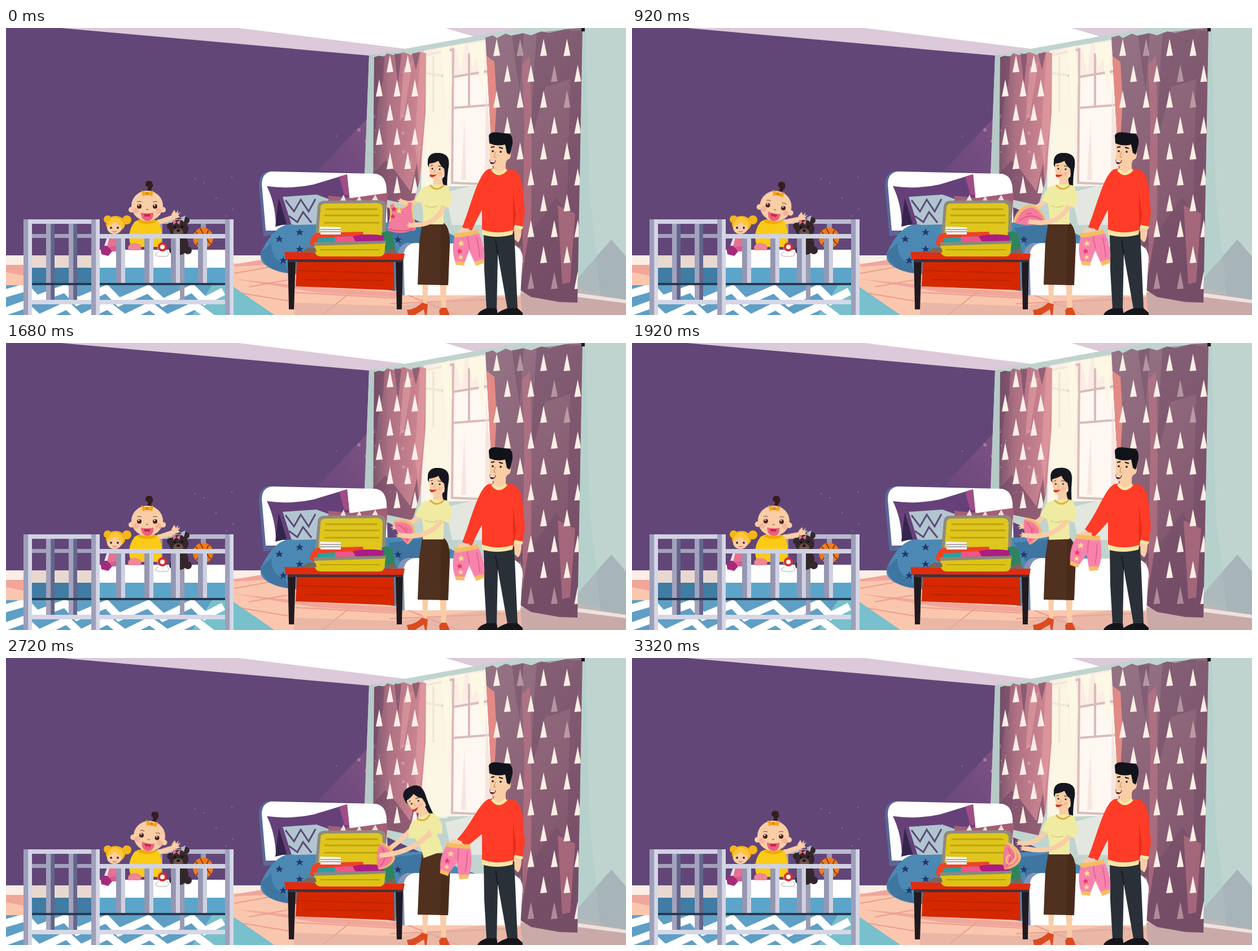
An HTML page for the animation above (3360 ms loop, 1098x510 px).

```html
<!DOCTYPE html>
<html lang="en">
<head>
<meta charset="utf-8">
<title>Packing for the baby</title>
<style>
html, body { margin: 0; width: 100%; height: 100%; overflow: hidden; background: #624678; }
svg { display: block; width: 100vw; height: 100vh; }
.skin { fill: #f9cda6; }
.limb { fill: none; stroke: #f9cda6; stroke-width: 8.5; stroke-linecap: round; stroke-linejoin: round; }
.move { animation: 3.36s linear infinite; }

.nod { transform-origin: 250px 340px; animation: nod .84s cubic-bezier(.37,0,.63,1) infinite alternate; }
@keyframes nod { to { transform: rotate(11deg); } }
.wave { transform-origin: 272px 345px; animation: wave .28s cubic-bezier(.37,0,.63,1) infinite alternate; }
@keyframes wave { to { transform: rotate(9deg); } }

.torso { transform-origin: 757px 348px; animation-name: torso; }
@keyframes torso {
  0%, 51% { transform: none; }
  57.1% { transform: rotate(-2deg); }
  69% { transform: rotate(-10deg); }
  81% { transform: rotate(-20deg); animation-timing-function: ease-in-out; }
  98%, 100% { transform: none; }
}
.head { transform-origin: 762px 282px; animation-name: head; }
@keyframes head {
  0%, 51% { transform: none; }
  57.1% { transform: rotate(-2deg); }
  69% { transform: rotate(-5deg); }
  81% { transform: rotate(-7deg); animation-timing-function: ease-in-out; }
  98%, 100% { transform: none; }
}
.near { animation-name: near; }
@keyframes near {
  0% { d: path("M779 304Q770 350 722 350"); }
  14% { d: path("M779 304Q765 352 712 339"); }
  27.4% { d: path("M779 306Q760 352 712 345"); }
  39.3% { d: path("M779 306Q758 349 708 342"); }
  57.1% { d: path("M776 308Q750 349 699 342"); }
  69% { d: path("M767 306Q735 348 687 346"); }
  81% { d: path("M755 306Q724 344 671 350"); }
  98%, 100% { d: path("M779 308Q758 350 699 339"); }
}
.far { animation-name: far; }
@keyframes far {
  0% { d: path("M738 298Q722 317 705 310"); }
  14% { d: path("M738 300Q718 325 700 321"); }
  27.4% { d: path("M738 300Q716 326 697 322"); }
  39.3% { d: path("M738 302Q718 327 692 328"); }
  57.1% { d: path("M735 302Q713 326 696 326"); }
  69% { d: path("M728 300Q708 325 700 328"); }
  81% { d: path("M720 302Q702 322 682 337"); }
  98%, 100% { d: path("M738 302Q716 332 692 329"); }
}
.shirt { transform-origin: 700px 334px; animation-name: shirt; }
@keyframes shirt {
  0% { transform: none; opacity: 1; }
  20% { transform: translate(4px, -1px) scale(1.06, .62); opacity: 1; }
  20.01%, 100% { transform: translate(4px, -1px) scale(1.06, .62); opacity: 0; }
}
.fold { animation-name: fold; }
@keyframes fold {
  0%, 20% { transform: translate(704px, 333px); opacity: 0; }
  20.01%, 27.4% { transform: translate(704px, 333px); opacity: 1; }
  39.3% { transform: translate(705px, 331px) rotate(32deg) scale(.86, .9); }
  57.1% { transform: translate(709px, 333px) rotate(82deg) scale(.84); }
  69% { transform: translate(688px, 345px) rotate(88deg) scale(.84); }
  81%, 100% { transform: translate(672px, 353px) rotate(98deg) scale(.84, .9); opacity: 1; }
}
.swirl { animation-name: swirl; }
@keyframes swirl { 0%, 81% { opacity: 0; } 88%, 100% { opacity: 1; } }
.pants { animation-name: pants; }
@keyframes pants {
  0%, 51% { transform: translate(815px, 365px) rotate(-10deg); }
  57.1% { transform: translate(808px, 345px) rotate(5deg); }
  69% { transform: translate(799px, 328px) rotate(3deg); }
  81% { transform: translate(801px, 333px) rotate(5deg); animation-timing-function: ease-in-out; }
  98%, 100% { transform: translate(815px, 365px) rotate(-10deg); }
}
.sleeve { animation-name: sleeve; }
@keyframes sleeve {
  0%, 51% { d: path("M854 251C836 258 822 320 808 354L825 360C835 337 845 317 856 304Z"); }
  57.1% { d: path("M854 251C838 258 826 299 802 331L818 345C834 330 846 313 856 304Z"); }
  69% { d: path("M854 251C838 258 824 294 797 317L815 330C834 318 846 308 856 304Z"); }
  81% { d: path("M854 251C838 258 824 296 799 322L816 335C834 321 846 309 856 304Z"); animation-timing-function: ease-in-out; }
  98%, 100% { d: path("M854 251C836 258 822 320 808 354L825 360C835 337 845 317 856 304Z"); }
}
</style>
</head>
<body>
<svg viewBox="0 0 1098 510" preserveAspectRatio="none">
<defs>
  <linearGradient id="drapeL"><stop offset="0" stop-color="#7b566e"/><stop offset=".3" stop-color="#ad7083"/><stop offset="1" stop-color="#d48a93"/></linearGradient>
  <linearGradient id="drapeR" x2=".3" y2="1"><stop offset="0" stop-color="#957486"/><stop offset=".55" stop-color="#8b6176"/><stop offset="1" stop-color="#7d526b"/></linearGradient>
  <linearGradient id="beam" x1="1" y1="0" x2="0" y2="1"><stop offset="0" stop-color="#e590b0" stop-opacity=".45"/><stop offset="1" stop-color="#b05a98" stop-opacity=".12"/></linearGradient>
  <linearGradient id="pane" x2="0" y2="1"><stop offset="0" stop-color="#fbeae4"/><stop offset="1" stop-color="#fdf4ea"/></linearGradient>
  <clipPath id="clipL"><path d="M652 52L675 45L744 44L743 150L733 270L720 315L650 300Z"/></clipPath>
  <clipPath id="clipR"><path d="M849 17L1021 0L1012 488L930 478L905 462L862 250Z"/></clipPath>
  <clipPath id="rug"><path d="M0 457H398L475 510H0Z"/></clipPath>
  <marker id="hand" markerUnits="userSpaceOnUse" markerWidth="18" markerHeight="15" refX="5" refY="10" orient="auto" viewBox="0 0 24 20">
    <path d="M2 5Q9 4 12 5L20 3L16 8L23 9L16 12L19 16L10 15L2 15Z" fill="#f9cda6"/>
  </marker>
  <path id="star" d="M0-7L2-2L7-2L3 1L5 6L0 3L-5 6L-3 1L-7-2L-2-2Z"/>
</defs>

<!-- room -->
<path fill="#624678" d="M0 0H97L643 48L634 260V410H0Z"/>
<path fill="#dcc9d9" d="M97 0H1030V20L850 30L643 49Z"/>
<path fill="#fff" d="M412 0H778L828 15L707 37Z"/>
<path fill="#c0d4cf" d="M643 48L707 37L828 15L915 0H1098V483L1012 470L634 300Z"/>
<path fill="#a6cac5" d="M1022 0H1026L1034 300L1054 475L1012 471Z" opacity=".4"/>
<path fill="#fbeee7" d="M0 404H460V424H0Z"/>
<path fill="#fbc6ae" d="M0 421L470 418L690 390L1098 482V510H0Z"/>
<path fill="#f1a69b" d="M0 421H31V440L0 434ZM404 420L452 412L480 420L404 424ZM404 446L560 462L700 470V479L550 470Z"/>
<g stroke="#e99e8f" stroke-width="2" fill="none"><path d="M404 436L494 420M410 470L500 485M512 470L690 480M430 460L498 448M610 470L560 510M700 470L800 510M680 490L910 480"/></g>
<path fill="#dfaea2" opacity=".6" d="M510 488L690 494L850 475L930 484L910 510H510Z"/>
<path fill="#c9aaa9" d="M910 470L1012 475L1098 486V510H915Z"/>
<path fill="#eee2df" d="M1012 471L1098 483V489L1012 478Z"/>
<path fill="#a8b3ba" opacity=".75" d="M1000 459L1072 376L1098 406V483L1012 471Z"/>
<path fill="#7f8f9b" opacity=".15" d="M1046 405L1072 376L1098 406V483L1053 476Z"/>
<path fill="url(#beam)" d="M744 50L553 253L680 262L742 250Z"/>

<!-- window -->
<path fill="url(#pane)" d="M740 40L852 20L866 280L760 282L735 300Z"/>
<path fill="#fff8f2" d="M795 84H853L860 278L792 275Z"/>
<g fill="none" stroke="#d9bcb9" stroke-width="4"><path d="M744 48L792 38L790 275L856 278M792 87L852 77M792 142L855 137M820 45V140M757 50V150M744 80L792 88"/></g>
<path fill="#fcf8e3" d="M742 46L770 35L773 105L786 215L782 285H742Z" opacity=".72"/>
<path fill="#fcf8e3" d="M770 37L785 31L790 90L782 192ZM793 32L813 28L806 83L800 50ZM818 28L849 24L844 125L834 55L826 70Z"/>
<path fill="#f3ded8" d="M812 160L815 270L806 270ZM850 100L864 278L848 278Z" opacity=".7"/>
<path fill="#f3f0e8" opacity=".7" d="M778 292L835 278L855 350H790Z"/>

<!-- curtains -->
<path fill="#b5cac7" d="M643 49L654 47L650 300L635 260Z"/>
<path fill="url(#drapeL)" d="M652 52L660 49L669 51L675 45L686 48L704 43L718 48L730 42L744 45L743 150L733 270L720 315L650 300Z"/>
<g clip-path="url(#clipL)">
  <path fill="#6f4864" opacity=".6" d="M652 50L670 50L668 90L659 130L650 220ZM688 45L700 47L694 103ZM650 260L672 235L690 255L716 290L728 240L735 320H650ZM719 45L733 43L726 75Z"/>
  <path fill="#e8a4a5" opacity=".5" d="M734 43L744 44L740 170L730 250L724 200ZM704 70L720 60L705 155L697 165Z"/>
</g>
<g id="trisL" fill="#fdeee8" clip-path="url(#clipL)"></g>
<path fill="url(#drapeR)" d="M849 17L862 13L869 18L885 10L896 14L915 9L930 13L948 6L962 9L990 2L1021 0L1012 488L980 487L930 478L905 462L862 250Z"/>
<g clip-path="url(#clipR)">
  <path fill="#e38a85" d="M849 48L865 60L869 130L862 250Z"/>
  <path fill="#6d4863" opacity=".4" d="M896 12L917 10L910 110L904 75ZM940 8L1000 1L1001 90L955 105L930 200L934 90ZM1001 5H1021L1012 488L990 488ZM905 380L940 350L975 300L1012 360V488H905Z"/>
  <path fill="#c17787" opacity=".6" d="M914 65L928 50L931 200L930 340L914 440L918 170ZM977 315L1008 330L999 452L985 455Z"/>
</g>
<g id="trisR" fill="#fdeee4" clip-path="url(#clipR)"></g>
<path fill="#191820" d="M1019 0H1025V6H1019Z"/>
<g id="dust" fill="#e5a8bd"></g>

<!-- bed -->
<path fill="#59689a" d="M448 282Q447 255 468 254L490 255L470 272L474 368L456 370Z"/>
<path fill="#fff" d="M453 278Q453 257 471 255L654 259Q672 261 674 285L676 360L460 360Z"/>
<path fill="#664179" d="M462 281Q505 287 545 278L604 260L608 300L600 350H478Q477 312 462 281Z"/>
<path fill="#a04d86" d="M590 264L604 260L608 298L599 296Z"/>
<path fill="#34254c" d="M477 353L483 302L497 348Z"/>
<path fill="#b1c5d0" d="M490 300L550 296L572 304L556 350L507 354L497 322Z"/>
<path fill="none" stroke="#5b4a78" stroke-width="3" d="M495 306L510 326L522 305L536 326L548 304M501 334L516 345L526 327L541 346"/>
<path fill="#a45f78" d="M570 298L612 302L676 293L672 350H585Z"/>
<g fill="#f5dcd8"><path d="M592 307L598 296L602 307ZM620 308L626 298L630 308ZM648 306L654 296L659 306Z"/></g>
<path fill="#4b89b4" d="M451 400Q478 342 512 350L740 344L800 372L850 390L705 392L690 468L500 435Q458 430 451 410Z"/>
<path fill="#3a6d9b" d="M451 400Q458 432 500 436L494 417Q470 415 470 382ZM676 355L740 348L790 372L700 392Z" opacity=".7"/>
<g id="bedStars" fill="#24396c"></g>
<path fill="#fff" d="M694 405Q696 382 716 382L892 384Q913 386 915 408L911 475H703Z"/>
<path fill="#8295b9" d="M694 403Q696 382 716 382L724 382Q704 385 704 408L706 475H701Z"/>

<!-- bench and suitcase -->
<path fill="#201a20" d="M499 410H513L510 500H501ZM690 410H703L701 500H692Z"/>
<path fill="#d52800" d="M515 415H687L688 466L513 459Z"/>
<path fill="none" stroke="#b82100" stroke-width="1.5" d="M516 431L687 436M530 447L670 449"/>
<path fill="#40323a" d="M500 410H702V416H500Z"/>
<path fill="#e02c10" d="M493 398L706 401L704 412L495 411Z"/>
<path fill="#8e8b7d" d="M547 376L552 317Q553 307 563 307L662 306Q673 307 673 318L672 376Z"/>
<path fill="#dfc51d" d="M553 370L557 320Q557 312 566 312L658 311Q667 312 667 320L666 372Z"/>
<path fill="none" stroke="#bca50d" stroke-width="3" stroke-linecap="round" d="M567 322H657M565 333H660M565 346H660"/>
<path fill="#2f835f" d="M665 364Q687 353 688 386L690 397L675 402L668 385Z"/>
<path fill="#ef4224" d="M538 384Q541 363 555 364L632 362L636 378L555 377L544 389Z"/>
<path fill="#f7f5f4" d="M556 353L593 354V367H557Z"/>
<path fill="none" stroke="#64616c" d="M557 358H593M557 362H593"/>
<path fill="#25a1a3" d="M552 374L611 370L614 381H551Z"/>
<path fill="#ee5589" d="M583 371L625 370L628 380H582Z"/>
<path fill="#ab1d84" d="M614 370Q639 364 670 369L666 382L619 379Z"/>
<path fill="#ddc414" d="M546 384L672 382L670 400Q668 406 660 406H558Q549 406 547 398Z"/>
<path fill="#8a897b" d="M545 381L673 378V383L546 387Z"/>
<path fill="none" stroke="#b9a211" stroke-width="2" d="M556 394H662"/>
<path fill="#77665b" d="M522 398L535 390L548 391L550 398ZM672 396L688 391L692 400H672Z"/>

<!-- crib -->
<g clip-path="url(#rug)">
  <path fill="#5f9fc5" d="M0 457H500V510H0Z"/><path fill="#78c0cc" d="M365 457H500V510H330Z"/>
  <path fill="none" stroke="#fff" stroke-width="14" d="M-10 474L35 461L54 482L105 463L126 486L178 464L200 487L252 464L278 488L330 463L352 485L385 468M-10 507L32 492L58 516L108 493L132 516L180 493L210 516L255 494L285 516L335 493L365 516"/>
</g>
<path fill="#e8d8d0" d="M46 404H152V426H46Z"/>
<path fill="#fff" d="M160 394H389V427H160Z"/>
<path fill="#407ca3" d="M46 426H166V454H46Z"/><path fill="#5ca5ca" d="M166 426H389V454H166Z"/>
<path fill="#a2a2bb" d="M46 366H152V373H46Z"/>
<path fill="#b9bacd" d="M268 340H403V348H268Z"/>
<path fill="#9b9bb3" d="M268 348H277V395H268ZM308 348H316V484H308ZM345 348H354V395H345Z"/>
<g id="sideBars"></g>

<!-- baby -->
<g class="wave"><path class="limb" d="M268 346L297 336"/><path class="skin" d="M293 331L298 323L301 329L305 323L304 330L309 327L305 333L308 336L296 340Z"/></g>
<path fill="#fbca17" d="M228 344Q250 333 270 344Q281 365 272 389H222Q212 365 228 344Z"/>
<path fill="#edac05" d="M233 344Q250 353 267 344L262 341H238Z"/>
<path fill="#ef8896" d="M216 390Q220 379 233 383Q243 386 238 395H217Z"/>
<g class="nod">
  <g fill="none" stroke="#351c1c" stroke-linecap="round"><path stroke-width="6" d="M252 291Q258 282 250 278Q250 273 256 275"/><path stroke-width="4" d="M256 275Q261 279 256 284"/></g>
  <circle class="skin" cx="222" cy="323" r="5"/><circle class="skin" cx="278" cy="323" r="5"/>
  <ellipse class="skin" cx="250" cy="316" rx="28" ry="27"/>
  <path fill="#f7a413" d="M250 294L240 288L242 299L250 296L259 299L261 289Z"/><circle cx="250" cy="294" r="3" fill="#e5890c"/>
  <circle cx="236" cy="317" r="4" fill="#4a211b"/><circle cx="264" cy="317" r="4" fill="#4a211b"/>
  <circle cx="235" cy="315" r="1.3" fill="#fff"/><circle cx="263" cy="315" r="1.3" fill="#fff"/>
  <path fill="none" stroke="#764231" d="M232 309Q236 307 240 309M260 309Q264 307 268 309M248 322Q250 324 252 322"/>
  <circle cx="230" cy="325" r="5" fill="#f4a095" opacity=".6"/><circle cx="270" cy="325" r="5" fill="#f4a095" opacity=".6"/>
  <path fill="#ee5f80" d="M239 328Q250 331 261 328Q262 342 250 343Q239 341 239 328Z"/><path fill="#c02a4c" d="M244 330Q250 331 256 330L254 336Q250 333 246 336Z"/>
</g>

<!-- toys -->
<g id="doll">
  <g fill="#f6b51b"><circle cx="180" cy="340" r="7"/><circle cx="214" cy="341" r="8"/><ellipse cx="194" cy="348" rx="17" ry="14"/></g>
  <ellipse class="skin" cx="192" cy="355" rx="13" ry="11"/><path fill="#ffc638" d="M179 353Q183 335 196 337Q207 340 208 353Q195 350 193 343Q188 350 179 353Z"/>
  <circle cx="186" cy="355" r="2" fill="#46302c"/><circle cx="198" cy="355" r="2" fill="#46302c"/><path fill="none" stroke="#c44" d="M189 361Q193 364 196 361"/>
  <path fill="#e7e6f0" d="M181 367H201L207 387H174Z"/><path fill="#e87091" d="M184 367H199L205 394H178Z"/>
  <path fill="#a52a7b" d="M167 391Q180 382 188 397L181 405L169 402Z"/><path fill="#d85a96" d="M184 389L200 387L201 397H187Z"/>
</g>
<g fill="#33272b"><circle cx="291" cy="352" r="6"/><circle cx="319" cy="342" r="6"/><ellipse cx="306" cy="357" rx="17" ry="16"/><ellipse cx="308" cy="385" rx="15" ry="18"/><circle cx="296" cy="395" r="7"/><circle cx="322" cy="395" r="7"/></g>
<ellipse cx="305" cy="363" rx="9" ry="7" fill="#6d5048"/><circle cx="299" cy="354" r="2" fill="#111"/><circle cx="312" cy="353" r="2" fill="#111"/><ellipse cx="305" cy="360" rx="3" ry="2" fill="#111"/>
<path fill="#ee6f82" d="M302 345L296 340L296 350ZM302 345L309 341L307 350Z"/><path fill="#b5b6c9" d="M309 337L318 333L315 345Z"/>
<circle cx="349" cy="373" r="18" fill="#f17b16"/><path fill="none" stroke="#74320f" stroke-width="1.6" d="M332 368Q350 376 366 366M344 356Q355 373 348 391M335 361Q348 374 337 386M359 359Q350 373 363 384"/>
<circle cx="277" cy="389" r="8" fill="#d92d2b"/><circle cx="277" cy="389" r="4" fill="#fff"/><path fill="none" stroke="#b6a1a8" d="M270 398Q257 404 272 406Q296 407 285 397"/>

<g id="frontBars"></g>
<path fill="#d0d2e2" d="M162 366H390V374H162ZM31 340H166V348H31Z"/>
<path fill="#27384d" d="M46 453H390V457H46Z"/>
<path fill="#d5d7e6" d="M46 483H389V491H46Z"/>
<g id="posts"></g>

<!-- woman -->
<path class="skin" d="M737 452H748L745 492L739 496ZM768 452H780L779 498H771Z"/>
<path fill="#dc4a20" d="M710 501Q725 500 737 488L747 491L745 510H742L740 500L724 510H712ZM767 502L771 497H780L786 510H768Z"/>
<path class="limb move far" d="M738 298Q722 317 705 310" marker-end="url(#hand)"/>
<path fill="#50301f" d="M737 347H776Q786 355 786 383L783 457L729 456L732 380Z"/>
<path fill="#3f2418" d="M771 347H776Q786 355 786 383L783 457L769 457Z" opacity=".4"/>
<g class="move torso">
  <g class="move head"><path fill="#15161f" d="M748 246Q743 222 764 222Q786 223 784 245Q781 262 781 285Q772 279 770 266Z"/></g>
  <path class="skin" d="M758 266H772L775 284L755 285Z"/>
  <path fill="#f0eba2" d="M740 282Q765 274 784 281L788 302L775 318V349H738Q741 332 736 311L725 307Q731 288 740 282Z"/>
  <path fill="none" stroke="#dcae3e" stroke-width="3" d="M751 279Q762 293 776 279"/>
  <path fill="none" stroke="#d9d080" stroke-width="2" d="M742 315Q752 321 764 316"/>
  <g class="move head">
    <path class="skin" d="M749 240Q763 229 778 245L777 260Q773 274 760 271Q749 268 749 240Z"/>
    <path fill="#15161f" d="M747 245Q745 222 764 222Q787 222 784 244L781 262L777 260L776 250Q769 245 766 236Q759 240 750 241Z"/>
    <circle cx="755" cy="250" r="1.6" fill="#222"/><circle cx="768" cy="251" r="1.6" fill="#222"/>
    <path fill="none" stroke="#222" d="M752 245L756 244M765 245L771 246"/><path fill="none" stroke="#dba077" d="M760 251L758 257"/>
    <path fill="#d72e1e" d="M750 260Q756 262 763 260Q757 267 751 264Z"/>
    <circle cx="768" cy="259" r="3" fill="#f5a88e" opacity=".5"/><circle cx="775" cy="263" r="1.5" fill="#fff"/>
  </g>
</g>
<g class="move shirt">
  <path fill="#f27c9d" d="M686 311Q690 322 699 320Q711 319 712 309L720 311Q717 326 725 352Q728 362 718 360Q697 368 678 360Q674 358 679 345Q684 328 679 316Z"/>
  <path fill="none" stroke="#f4c370" stroke-width="2.5" d="M686 311Q690 322 699 320Q711 319 712 309M720 311Q717 326 725 351M679 316Q684 328 679 345"/>
  <path fill="none" stroke="#d55880" stroke-width="2" d="M678 357Q700 364 722 357"/>
  <use href="#star" transform="translate(687 322) scale(.7)" fill="#db2f4f"/><use href="#star" transform="translate(696 325) scale(.8)" fill="#ffe08a"/><use href="#star" transform="translate(685 335) scale(.7)" fill="#e63056"/>
</g>
<g class="move fold">
  <path fill="#f4b873" d="M-29 12C-25-9-10-19 2-19C17-17 27-1 29 10Q0 22-29 12Z"/>
  <path fill="#f47c9e" d="M-25 14C-19-5-7-14 3-14C15-12 24 1 27 11Q0 21-25 14Z"/>
  <path fill="none" stroke="#db4c79" stroke-width="1.5" d="M-18 10Q0-7 22 8M-6-2L3-4"/>
  <path class="move swirl" fill="none" stroke="#f3d06a" stroke-width="3" d="M-22 5Q-5-17 13-3Q21 8 5 9Q-6 7-1 1"/>
</g>
<path class="limb move near" d="M779 304Q770 350 722 350" marker-end="url(#hand)"/>
<path class="move torso" fill="#f0eba2" d="M774 283Q791 286 789 306L784 320L765 312Z"/>

<!-- man -->
<path class="skin" d="M899 354H913Q913 375 907 381L899 374Z"/>
<path fill="#2a3038" d="M846 361H900L902 408L906 499H888L871 402L869 499H851L847 430Z"/>
<path fill="none" stroke="#151a20" stroke-width="2" d="M871 402L867 378"/>
<path fill="#15161c" d="M835 510Q837 503 851 498H869L871 510ZM867 510Q873 503 888 498H906L915 506V510Z"/>
<path fill="#ff3c27" d="M853 251Q875 247 899 252Q913 258 915 285L919 328L914 357L900 354L902 336L898 310V365H843V304Z"/>
<path fill="#e52c19" d="M898 289L903 333L898 365Z"/>
<path fill="#f4e7a5" d="M843 358Q870 368 898 359L897 367Q869 375 843 367ZM901 350L916 353L914 358L899 355Z"/>
<path class="skin" d="M865 240H885V254Q875 264 863 253Z"/>
<path fill="none" stroke="#f4e7a5" stroke-width="5" d="M861 251Q872 267 886 251"/>
<path class="skin" d="M857 202L885 205L890 219Q897 221 892 232L887 235Q882 251 868 248Q855 245 857 225Z"/>
<path fill="#11131a" d="M855 191Q858 183 874 186L891 188Q898 191 897 206L892 225L887 222L884 207Q870 211 856 205Z"/>
<path fill="none" stroke="#11131a" stroke-width="2" d="M859 212L865 211M873 212L880 214"/><circle cx="862" cy="219" r="1.8" fill="#171717"/><circle cx="876" cy="220" r="1.8" fill="#171717"/>
<path fill="none" stroke="#d79972" stroke-width="1.3" d="M867 220L864 229L868 230"/><path fill="#5e1715" d="M856 234Q862 237 868 235Q865 244 858 241Z"/><path fill="#fff" d="M857 235L867 236L864 239L858 238Z"/>
<path class="move sleeve" fill="#ff3c27" d="M854 251C836 258 822 320 808 354L825 360C835 337 845 317 856 304Z"/>
<g class="move pants">
  <path class="skin" d="M-12-10L6-8L5 2L-8 6L-17 0Z"/>
  <path fill="#f783ad" d="M-20 0H21Q30 30 23 53L6 55L0 31L-12 51L-28 47Q-32 22-20 0Z"/>
  <path fill="none" stroke="#db5b8b" stroke-width="1.5" d="M1 5V28M17 10Q18 30 16 46"/>
  <path fill="#f5bd62" d="M-21-4Q0-1 21-4L22 4Q0 6-22 4ZM-28 45L-12 49L-13 56L-28 52ZM6 52L22 50L23 57L7 60Z"/>
  <use href="#star" transform="translate(-12 16) scale(.85)" fill="#ffe18a"/><use href="#star" transform="translate(-17 29) scale(.8)" fill="#e83565"/><use href="#star" transform="translate(-17 40) scale(.7)" fill="#ffe18a"/>
</g>
</svg>
<script>
const put = (id, markup) => document.getElementById(id).innerHTML += markup;
const range = n => [...Array(n).keys()];
const rect = (x, y, w, h, fill) => `<rect x="${x}" y="${y}" width="${w}" height="${h}" fill="${fill}"/>`;
const bar = (x, y, w, h, shade, light) => rect(x, y, w, h, light) + rect(x, y, w * .55, h, shade);
const dot = (x, y, r, opacity) => `<circle cx="${x}" cy="${y}" r="${r}" opacity="${opacity}"/>`;
const tri = (x, y, opacity = 1) => `<path opacity="${opacity}" d="M${x} ${y - 16}L${x + 6} ${y + 14}L${x - 6} ${y + 15}Z"/>`;

for (const row of range(10)) {
  const odd = row % 2;
  for (const col of range(4)) {
    const faint = (row * 3 + col * 5) % 8 === 5 || row > 7 && col < 2;
    put('trisR', tri((odd ? 888 : 869) + col * 41.5, 35 + row * 46, faint ? .4 : 1));
  }
  if (row < 6) for (const col of range(odd ? 3 : 2))
    put('trisL', tri((odd ? 661 : 680) + col * 31.5, 64 + row * 43));
}

let seed = 17;
const random = () => (seed = seed * 16807 % 2147483647) / 2147483647;
for (const i of range(30))
  put('dust', dot(640 + random() * 105, 150 + random() * 120, .6 + random(), .4));
for (const [x, y] of [[625, 181], [638, 201], [703, 187], [704, 220], [716, 239], [703, 157]])
  put('dust', dot(x, y, 3, .45));
for (const [x, y] of [[335, 268], [350, 275], [400, 265], [402, 322], [372, 302], [390, 334], [585, 192]])
  put('dust', dot(x, y, .9, .6));
for (const [x, y] of [[484, 375], [520, 363], [491, 413], [694, 376], [520, 393]])
  put('bedStars', `<use href="#star" x="${x}" y="${y}"/>`);

for (const x of [71, 111])
  put('sideBars', bar(x, 348, 15, 136, '#a2a3bc', '#63658c'));
for (const x of [195, 245, 292, 340])
  put('frontBars', bar(x, 373, 16, 81, '#9596b1', '#cfd1e1'));
for (const x of [31, 151, 388])
  put('posts', bar(x, 340, 15, 170, '#9e9fb9', '#d5d7e6'));
</script>
</body>
</html>
```
